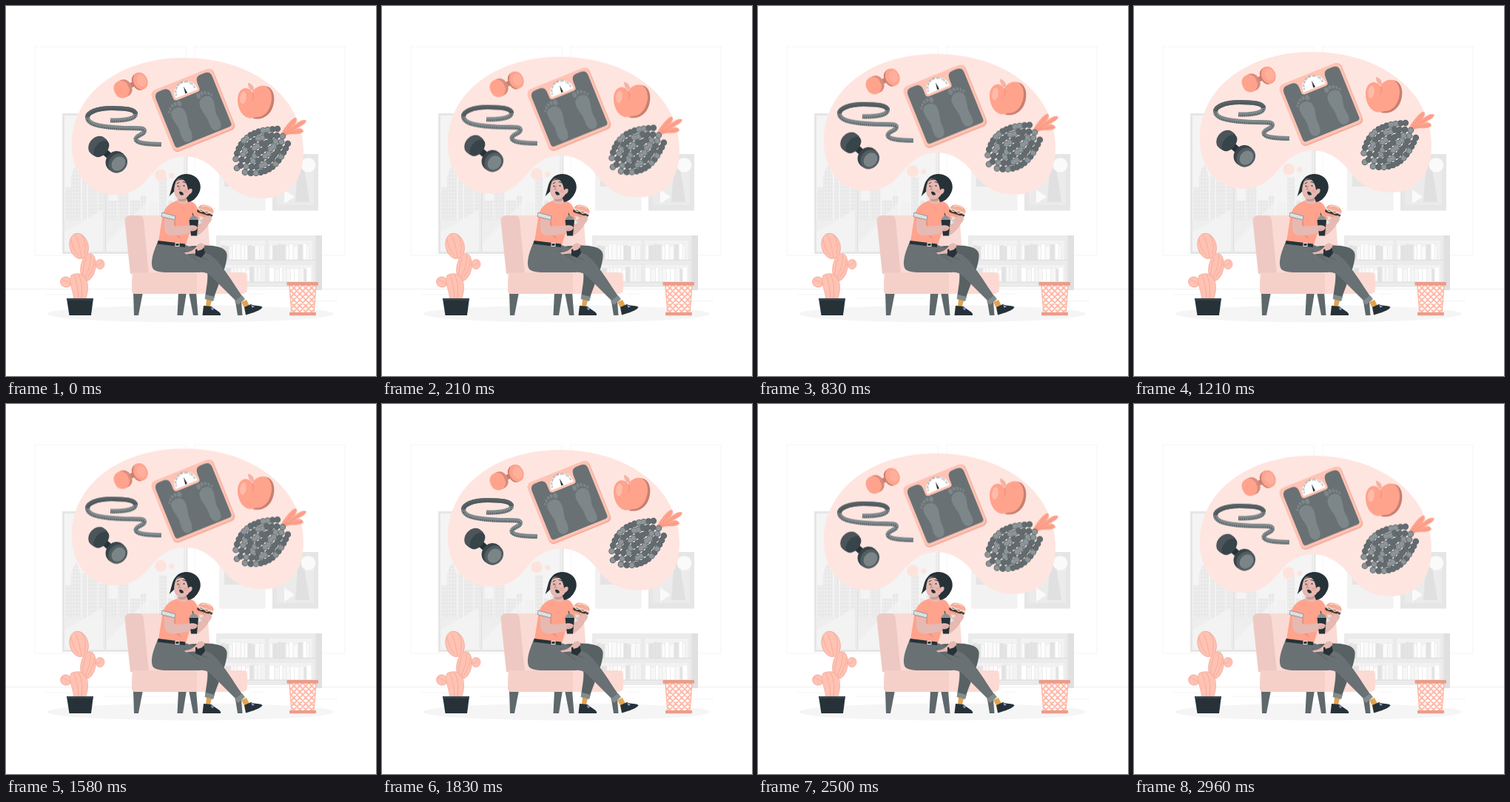
An HTML page for the animation above (3000 ms loop, 500 px wide and 500 px high).

```html
<!DOCTYPE html>
<html lang="en">
<head>
<meta charset="utf-8">
<title>Daydream about a healthy life</title>
<style>
html, body { margin: 0; height: 100%; overflow: hidden; background: #fff; }
svg { display: block; width: 100vw; height: 100vh; }
.ink { fill: #263238; }
.grey { fill: #697174; }
.coral { fill: #ffa38d; }
.skin { fill: #e6b9b2; }
.line { fill: none; stroke-linecap: round; stroke-linejoin: round; }
</style>
</head>
<body>
<svg viewBox="0 0 500 500">
  <defs>
    <pattern id="panes" width="4" height="5" patternUnits="userSpaceOnUse">
      <rect width="4" height="5" fill="#e9e9e9"/><rect x="1" y="1" width="1.2" height="2" fill="#f4f4f4"/>
    </pattern>
    <path id="band" d="M141,154.500C162,155 175,152 175,146C175,139.500 160,138 143,138C122,138 110,144 110,150.500C110,161 132,164 160,165C177,165.500 187,164 187,169C187,174 175.500,174 175.500,180C175.500,185.500 192,187 210,187"/>
    <path id="arc" d="M-12.500,-27A12.500,12.500 0 0 1 12.500,-27"/>
    <g id="foot">
      <path d="M-9,-8C-8,-16 6,-18 10,-8C12,2 7,9 7.500,18C8,27 7,34 0,34C-7,34 -8,27 -6.500,18C-5,8 -10,2 -9,-8Z"/>
      <ellipse cx="7" cy="-18.500" rx="3" ry="3.800"/><ellipse cx="1.500" cy="-20" rx="2" ry="2.800"/>
      <ellipse cx="-3" cy="-19" rx="1.700" ry="2.500"/><ellipse cx="-6.800" cy="-16.500" rx="1.500" ry="2.200"/>
      <ellipse cx="-9.800" cy="-13" rx="1.300" ry="2"/>
    </g>
    <clipPath id="mesh"><path d="M382.500,377H419.500L416.500,416H385.500Z"/></clipPath>
  </defs>

  <!-- room -->
  <g fill="none" stroke="#f3f3f3" stroke-width=".8">
    <rect x="39" y="55" width="204" height="282"/><rect x="255" y="55" width="203" height="282"/>
    <path d="M0,382.500H500" stroke="#ebebeb"/>
    <path d="M416,398.500H448M330,389H349M53,390H96M104,390H110M131,395H225" stroke="#f1f1f1"/>
  </g>
  <rect x="76" y="145" width="169.500" height="190" fill="#e6e6e6"/>
  <rect x="79" y="148" width="164" height="184" fill="#f4f4f4"/>
  <g id="city" fill="url(#panes)"></g>
  <path d="M79,289H243V332H79Z" fill="#eeeeee"/>
  <path d="M79,306L131,275V332H79ZM136,320L205,250V300L175,332H136Z" fill="#f5f5f5" opacity=".7"/>
  <path d="M131.500,146V334H135.500V146Z" fill="#ebebeb"/>
  <path d="M134.500,146V334M241,146V334" stroke="#e0e0e0"/>

  <rect x="288" y="200" width="62.500" height="76.500" fill="#f2f2f2"/>
  <path d="M295,208H316V244H295Z" fill="#e4e4e4"/>
  <rect x="360" y="200" width="62" height="76.500" fill="#e6e6e6"/>
  <path d="M366,207H416V269H366Z" fill="#ebebeb"/>
  <path d="M395,213H402L410,265H391Z" fill="#e0e0e0"/>
  <path d="M376,248L390,258L376,267Z" fill="#fafafa"/>
  <circle cx="408.500" cy="215" r="9.800" fill="#fafafa"/>

  <rect x="284" y="310" width="135" height="70" fill="#ebebeb"/>
  <rect x="418.500" y="310" width="8.500" height="74" fill="#e0e0e0"/>
  <path d="M289,317H350V343H289ZM355,317H414V343H355ZM289,350H350V373H289ZM355,350H414V373H355Z" fill="#f2f2f2"/>
  <g id="books"></g>
  <path d="M284,343.500H419M284,373H419" stroke="#dedede"/>
  <ellipse cx="249.500" cy="416" rx="193.500" ry="11.500" fill="#f5f5f5"/>

  <!-- floating thought -->
  <g id="dream">
    <path fill="#fee5e0" d="M89,188C89,116 157,70 240,70C335,70 402,124 402,196C402,239 380,260 347,260C320,260 305,249 291,231C279,215 262,203.500 243,203.500C222,203.500 209,213 197,227C184,243 172,255 148,255C109,255 89,223 89,188Z"/>
    <circle cx="209" cy="228.500" r="8" fill="#fee3dd"/><circle cx="223.800" cy="229" r="3.600" fill="#fee3dd"/>

    <g transform="rotate(-24 169 107)">
      <rect x="160" y="103.500" width="22" height="7" fill="#c98071"/>
      <rect x="147" y="95" width="22" height="24" rx="10" fill="#d98c7b"/>
      <rect x="145" y="95" width="20" height="24" rx="10" class="coral"/>
      <rect x="172" y="95" width="18" height="24" rx="9" fill="#c98071"/>
      <ellipse cx="183" cy="107" rx="9.500" ry="12" class="coral"/>
      <ellipse cx="184.500" cy="107" rx="6" ry="8.500" fill="#ffb09d"/>
    </g>

    <use href="#band" class="line" stroke="#808a8d" stroke-width="6.200" style="stroke-linecap:butt"/>
    <path class="line" style="stroke-linecap:butt" stroke="#596265" stroke-width="6.200" d="M175,146C175,139.500 160,138 143,138C122,138 110,144 110,150.500"/>
    <use href="#band" class="line" y="1.500" stroke="#3c474c" stroke-width="2.500" stroke-dasharray=".8 1.800" style="stroke-linecap:butt"/>

    <g transform="rotate(41 138 201)">
      <rect x="124" y="196.500" width="27" height="9" class="ink"/>
      <rect x="109.500" y="187" width="23" height="28" rx="11" fill="#37444a"/>
      <ellipse cx="119" cy="201" rx="11" ry="14" fill="#4b555a"/>
      <ellipse cx="126" cy="201" rx="8" ry="13" fill="#37444a"/>
      <rect x="139" y="186.500" width="27" height="29" rx="13" fill="#37444a"/>
      <ellipse cx="155.500" cy="201" rx="12" ry="14" fill="#525d61"/>
      <ellipse cx="156.500" cy="201" rx="8.500" ry="10.500" fill="#7b8487"/>
    </g>

    <g transform="translate(253 141) rotate(-22)">
      <rect x="-45" y="-44.500" width="90" height="89" rx="7" fill="#f5ac9a"/>
      <rect x="-45" y="-45" width="89" height="87.500" rx="7" fill="#ffc3b4"/>
      <path class="grey" d="M-41,-33Q-41,-41 -33,-41H-27Q-19,-41 -19,-32V-25Q-19,-21 -15,-21H15Q19,-21 19,-25V-32Q19,-41 27,-41H33Q41,-41 41,-33V35Q41,39 37,39H-37Q-41,39 -41,35Z"/>
      <path d="M-16,-24C-17,-34 -10,-41 0,-41C10,-41 17,-34 16,-24Z" fill="#fff"/>
      <text font-family="Liberation Sans, sans-serif" font-size="3.400" fill="#444e52"><textPath href="#arc">0 20 40 60 80 100 120 140</textPath></text>
      <path class="ink" d="M-1.500,-25L0,-35L1.500,-25Z"/>
      <g fill="#7d8689"><use href="#foot" x="-21" y="3"/><use href="#foot" transform="translate(21 3) scale(-1 1)"/></g>
    </g>

    <path fill="#c97f70" d="M336,118C340,109 350,105 357,111C364,117 364,132 358,142C352,151 343,154 334,152Z"/>
    <path class="coral" d="M333,117C328,107 314,109 313,125C312.500,140 321,152 331,151.500C335,151.500 337,150 340,150C350,150 358,139 359,126C360,113 352,106 344,108C339,109 335,112 333,117Z"/>
    <path class="line" stroke="#e58e7b" d="M333,117C335,121 335,124 333,127"/>
    <path fill="#f3b3a4" d="M327,104C333,105 336,110 335,116C330,114 327,110 327,104Z"/>
    <ellipse cx="320.500" cy="124" rx="4.200" ry="8.500" fill="#ffbbaa" transform="rotate(8 320 124)"/>

    <path class="coral" d="M369,178C374,166 384,154 390,151C395,150 393,157 389,162C395,156 402,152 406,155C405,160 397,163 392,166C397,164 402,166 402,170C396,175 387,172 381,174C377,176 373,178 369,178Z"/>
    <path class="line" stroke="#e88f7c" stroke-width=".7" d="M373,175L390,154M376,173L402,157M379,172L399,169"/>
    <g id="grapes"></g>
  </g>

  <!-- chair -->
  <path fill="#5f686b" d="M172,387H185L179,418H173ZM233,387H244L239,418H231.500ZM247,387H257L259.500,418H253ZM308,387H317L319.500,418H313Z"/>
  <path fill="#fadad4" d="M180,283H262Q272,283 273,294L278,362H188Z"/>
  <path fill="#eec9c3" d="M160.500,290Q161,283 168,283H180Q185,283 186,290L193,362H168Z"/>
  <path fill="#eec9c3" d="M171,360H262V389H175Q169.500,389 170,382Z"/>
  <path fill="#fcdad3" d="M192,360H321Q326,360 326,366V382Q326,389 319,389H258V365Q258,360 252,360Z"/>
  <path fill="#f5d0c9" d="M171,360H253Q258,360 258,366V389H175Q169.500,389 170,382Z"/>

  <!-- far leg -->
  <path fill="#e2a44f" d="M271,396L278,398L276,406H270Z"/>
  <path class="ink" d="M267,405L278,406C281,410 288,412 290,416V418H265.500Z"/>
  <path fill="#8aa0e8" d="M277,406L281,410L278,411Z"/>
  <path fill="#586164" d="M246,325C272,322 296,323 298.500,335C300,350 286,377 280,398L269,395C271,377 275,365 270,350L240,340Z"/>
  <path fill="#838b8d" d="M270,390L282,393L280,399L268.500,396Z"/>

  <!-- near leg -->
  <path fill="#e2a44f" d="M318,400L325,397L329,405L322,408Z"/>
  <path class="ink" d="M322,407L331,403C336,406 343,404 346.500,407C345,411 333,415 324,417.500Z"/>
  <path fill="#8aa0e8" d="M331,404L336,406L333,408Z"/>
  <path class="grey" d="M205,319C199,332 195,345 198,354C201,360 212,360 225,360H262C268,359 273,361 278,366L314,402L321,395C308,376 295,354 282,341C274,333 258,330 243,323Z"/>
  <path fill="#838b8d" d="M309,399L319,391L323,396L313.500,404Z"/>
  <path class="line" stroke="#535c5f" stroke-width=".9" d="M240,330C250,338 262,338 272,343M246,335L262,346"/>

  <!-- torso and head -->
  <path class="skin" d="M258,272L263,290L270,283L277,288C274,297 266,307 257,311L246,302Z"/>
  <path class="coral" d="M229,264C221,266 215,272 212,281L206,318L243,323L248,307L258,292C263,286 261,270 252,265C245,262 236,262 229,264Z"/>
  <path fill="#e98e7a" d="M229,289C229,298 230,307 237,315C230,312 224,304 224,290Z"/>
  <path class="ink" d="M205.500,317L242,321.500V326L204.500,321.500Z"/>
  <rect x="229" y="320.500" width="5" height="4" fill="none" stroke="#e6e6e6"/>
  <path class="skin" d="M233,254L247,250V265C243,269 235,268 231,264Z"/>
  <path fill="#c99b95" d="M234,260C240,262 244,259 246,255V261C242,265 237,265 233,263Z"/>
  <path class="ink" d="M220.500,257C224,249 224,238 230,233C236,226 248,225 256,231C263,236 265,246 260,254C257,260 252,264 246,265L243,257L228,250Z"/>
  <path class="skin" d="M230,236C227,244 226,251 229,257C232,262 241,262 246,257C250,252 252,244 249,238C245,232 235,231 230,236Z"/>
  <path class="ink" d="M229,238C233,232 246,230 251,238C252,246 250,253 247,257C246,248 246,241 240,235C236,234 232,235 229,238Z"/>
  <path class="skin" d="M246,249C250,244 254,248 250,253L246,256Z"/>
  <path class="ink" d="M234,251C237,250 240,252 240,255C237,257 234,255 234,251Z"/>
  <g class="line" stroke="#263238" stroke-width=".9"><path d="M231,240L234,238.500M239,237.500L243,239"/><path d="M235,243L233.500,248L236,248.300" stroke="#b77d76"/></g>
  <circle cx="232.500" cy="243.500" r=".9" class="ink"/><circle cx="240.500" cy="243" r=".9" class="ink"/>
  <circle cx="243" cy="250" r="2.600" fill="#efa197" opacity=".7"/>

  <!-- arm, drink, burger -->
  <path class="skin" d="M214,287L228,289C226,295 227,298 231,298L251,296L256,302L249,307C238,309 222,313 217,308C213,303 214,295 214,287Z"/>
  <path fill="#dce1e2" stroke="#77858a" stroke-width=".7" d="M211,279L229,284L228,289L210,284.500Z"/>
  <path class="line" stroke="#263238" d="M254.500,288L252,280"/>
  <path class="ink" d="M247.500,289H260L258,310.500H250Z"/>
  <path fill="#8b9497" d="M248,289C248,282 259,282 259.500,289Z"/>
  <path fill="#dfe5e6" d="M260,288L265,293L260,295ZM260,281L267,286L263,288Z"/>
  <path class="skin" d="M246,298C250,295 257,296 259,299C258,304 252,305 248,304Z"/>
  <path class="line" stroke="#c99b95" stroke-width=".7" d="M250,300H257M250,302.500H256"/>
  <g transform="translate(269.500 277.500) rotate(18)">
    <path fill="#f2a58f" d="M-10,3H10C10,7 7,8.500 4,8.500H-5C-8,8.500 -10,7 -10,3Z"/>
    <rect x="-11" y="0" width="22" height="4.500" rx="2" fill="#4a3a37"/>
    <path class="line" stroke="#f4d6c8" stroke-width="1.400" d="M-10,0L-6,2L-2,0L2,2L6,0L10,1"/>
    <path fill="#f6ad98" d="M-11,-1C-11,-11 11,-11 11,-1Z"/>
    <path class="line" stroke="#ffd1c3" stroke-width="1.300" d="M-6,-5C-3,-8 2,-8 5,-6"/>
  </g>
  <path class="skin" d="M265,290C267,284 272,285 275,283C279,284 279,290 275,293L267,299Z"/>

  <!-- lap -->
  <path class="skin" d="M241,333C248,333 254,330 258,324C260,320 266,319 268,323C269,329 264,333 258,334L243,335.500Z"/>
  <path class="ink" d="M256,329L267,325L269,334L264,340L256,337Z"/>
  <path class="skin" d="M257,326C261,322 266,322 268,325L265,329L259,331Z"/>

  <!-- cactus -->
  <g fill="#ffc2b3" stroke="#f3a896" stroke-width=".8">
    <ellipse cx="81" cy="373" rx="7.500" ry="7" transform="rotate(20 81 373)"/>
    <ellipse cx="127" cy="349" rx="6" ry="6.500"/>
    <ellipse cx="98.500" cy="324.500" rx="12.500" ry="17.500" transform="rotate(-14 98 324)"/>
    <ellipse cx="111" cy="353" rx="10" ry="18.500" transform="rotate(10 111 353)"/>
    <path d="M88,364C95,360 106,361 109,370C112,380 110,390 107,397H92C91,384 84,374 88,364Z"/>
    <path class="line" d="M94,310C99,320 100,330 102,340M88,316C90,325 93,332 98,338M102,309C108,318 108,328 106,336M114,337C116,348 110,360 106,369M108,341C105,350 103,358 104,366M119,343C120,352 114,362 110,368M98,363C104,374 103,386 102,396M92,364C97,376 97,386 98,396M76,370C81,371 86,374 88,377M122,351C126,351 129,347 131,344"/>
  </g>
  <path class="ink" d="M82,395H118L115,418H85.500Z"/>
  <path fill="#37474f" d="M82,395H118L117.700,397.500H82.400Z"/>

  <!-- basket -->
  <path fill="#fff4f1" d="M382.500,377H419.500L416.500,416H385.500Z"/>
  <path fill="#fff" stroke="#e5e5e5" stroke-width=".6" d="M389,393L397,387L405,392L410,388L415,398L408,405L397,402L390,406Z"/>
  <path id="lattice" clip-path="url(#mesh)" fill="none" stroke="#ffb5a3" stroke-width="1.700"/>
  <path fill="none" stroke="#ffb5a3" stroke-width="1.300" d="M383,377L386,415M419,377L416,415"/>
  <rect x="379.500" y="373" width="42.500" height="4.800" rx="1" fill="#eb9d8b"/>
  <rect x="383" y="414" width="36" height="4.300" rx="1" fill="#eb9d8b"/>
</svg>
<script>
const NS = 'http://www.w3.org/2000/svg';
const $ = id => document.getElementById(id);
const add = (parent, tag, attrs) => {
  const el = document.createElementNS(NS, tag);
  for (const k in attrs) el.setAttribute(k, attrs[k]);
  parent.append(el);
};

let seed = 11;
const rnd = () => (seed = seed * 16807 % 2147483647) / 2147483647;
for (let i = 0; i < 20; i++) rnd();

// Skyline
for (let x = 80; x < 238;) {
  const width = 6 + rnd() * 9, top = 220 + rnd() * 45;
  add($('city'), 'rect', { x, y: top, width: Math.min(width, 242 - x), height: 290 - top });
  x += width + rnd() * 3;
}
add($('city'), 'path', { d: 'M88,290V231L91,221L95,214L98,221L101,231V290Z' });

// Books
for (const [base, tall] of [[343, 22], [373, 21]])
  for (const left of [290, 356])
    for (let x = left; x < left + 53;) {
      const width = 3 + rnd() * 4, height = tall - rnd() * 4;
      const fill = ['#fff', '#fafafa', '#f7f7f7', '#e2e2e2'][Math.floor(rnd() * 4)];
      add($('books'), 'rect', { x, y: base - height, width, height, fill, stroke: '#e6e6e6', 'stroke-width': .5 });
      x += width + .4;
    }

// Grapes along a slanted axis, widest near the middle
const spots = [];
for (let s = 0, row = 0; s <= 78; s += 5.8, row++) {
  const half = 3 + 23 * Math.sin(Math.PI * (s / 90) ** .8);
  const n = Math.max(1, Math.round(half / 3.7));
  for (let i = 0; i < n; i++) {
    const off = n > 1 ? half * (2 * i / (n - 1) - 1) : 0;
    spots.push([312 + s * .82 + off * .57, 219 - s * .57 + off * .82, (row + 2 * i) % 5 < 2]);
  }
}
for (const [cx, cy] of spots) add($('grapes'), 'circle', { cx, cy, r: 4.3, fill: '#555f63' });
for (const [cx, cy, light] of spots)
  add($('grapes'), 'circle', { cx, cy, r: 3.5, fill: light ? '#8c9598' : '#626c70' });

// Basket weave
let weave = '';
for (let x = 336; x < 424; x += 8) weave += `M${x},376l42,42M${x + 42},376l-42,42`;
$('lattice').setAttribute('d', weave);

// Rise and sink at constant speed, 24 pictures a second
$('dream').animate([
  { transform: 'translateY(0px)', easing: 'steps(36)' },
  { transform: 'translateY(-10px)', easing: 'steps(36)' },
  { transform: 'translateY(0px)' }
], { duration: 3000, iterations: Infinity });
</script>
</body>
</html>
```
